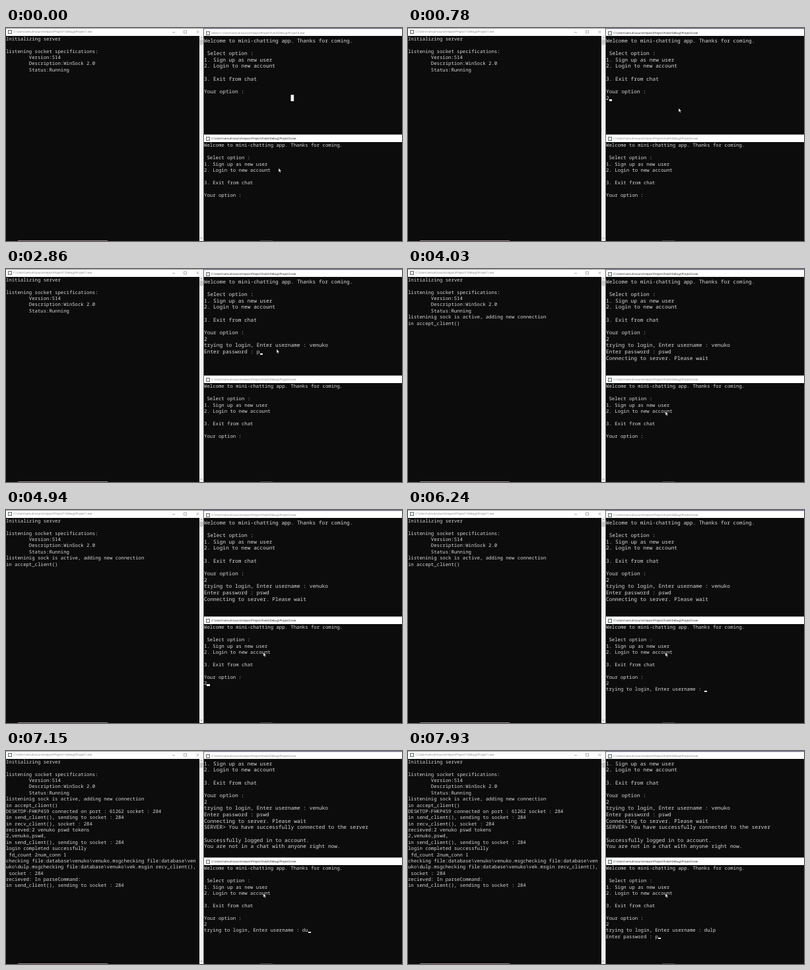
Write an HTML page that moves like this. It is 600x323 px and loops after 8 s.

```html
<!DOCTYPE html>
<html lang="en">
<head>
<meta charset="utf-8">
<title>Chat server and two clients</title>
<style>
  html, body { margin: 0; width: 100%; height: 100%; overflow: hidden; background: #0c0c0c; }
  #stage { position: relative; width: 600px; height: 323px; overflow: hidden; background: #0c0c0c; text-rendering: geometricPrecision; }
  #stage * { position: absolute; box-sizing: border-box; }
  .window { overflow: hidden; background: #0c0c0c; }
  .bar { left: 0; top: 0; width: 100%; background: #fff; }
  .icon { left: 3px; top: 3px; width: 6px; height: 6px; background: #e6ecee; border: 1px solid #66706f; }
  .title { left: 11.2px; top: 1.2px; font: 4.38px/11.5px "Open Sans", sans-serif; white-space: pre; color: #777; }
  .active .title { color: #111; }
  .screen { left: 0; margin: 0; font-family: "Noto Sans Mono", monospace; white-space: pre; color: #dadada; }
  .caret { height: 2.4px; background: #f2f2f2; }
  svg { left: 0; top: 0; overflow: visible; }
</style>
</head>
<body>
<div id="stage"></div>
<script>
const LOOP = 8000, KEY = 130;
const USER = 'venuko', FRIEND = 'dulp', OTHER = 'vek', HOME = 'venuk';
const stage = document.getElementById('stage');

const typing = (start, keys) => [...keys].map((key, i) => [start + i * KEY, key, true]);
const latest = (steps, t) => steps.filter(step => step[0] <= t).pop();

const MENU = `Welcome to mini-chatting app. Thanks for coming.

 Select option :
1. Sign up as new user
2. Login to new account

3. Exit from chat

Your option :
`;
const ASK_NAME = '\ntrying to login, Enter username : ';
const ASK_PASSWORD = '\nEnter password : ';
const TAB = ' '.repeat(8);
const FILES = 'checking file:database\\' + USER + '\\';

// Each step: time, text appended, caret shown
const serverSteps = [
  [0, `Initializing server\n\nlistening socket specifications:\n${TAB}Version:514\n${TAB}Description:WinSock 2.0\n${TAB}Status:Running\n`],
  [3510, 'listeninig sock is active, adding new connection\nin accept_client()\n'],
  [6500, `DESKTOP-FHKP4S9 connected on port : 61262 socket : 284
in send_client(), sending to socket : 284
in recv_client(), socket : 284
recieved:2 ${USER} pswd tokens
2,${USER},pswd,
in send_client(), sending to socket : 284
login completed successfully
 fd_count 2num_conn 1
${FILES}${USER}.msg${FILES}${FRIEND}.msg${FILES}${OTHER}.msg`],
  [7020, 'in recv_client(), socket : 284\nrecieved: In parseCommand:\nin send_client(), sending to socket : 284\n'],
];

const upperSteps = [
  [0, MENU],
  [650, '', true],
  [780, '2', true],
  [1040, ASK_NAME, true],
  ...typing(1690, [...USER.slice(0, 3), USER.slice(3, 5), USER.slice(5)]),
  [2340, ASK_PASSWORD, true],
  ...typing(2860, 'pswd'),
  [3380, '\nConnecting to server. Please wait\n', true],
  [3510, ''],
  [6500, 'SERVER> You have successfully connected to the server\n\nSuccessfully logged in to account.\n'],
  [7020, 'You are not in a chat with anyone right now.\n'],
];

const lowerSteps = [
  [0, MENU],
  [130, '', true],
  [260, ''],
  [4160, '', true],
  [4550, ''],
  [4680, '', true],
  [4940, '2', true],
  [5330, ASK_NAME, true],
  [5980, ''],
  [6240, '', true],
  [6630, ''],
  ...typing(7020, FRIEND),
  [7540, ASK_PASSWORD, true],
  [7930, 'p', true],
];

const mouseSteps = [[0, 413, 212.5], [130, 412, 170], [260, 410, 121.5], [3900, 399, 172], [4030, 390, 216]];
const focusSteps = [[0, 'lower'], [260, 'upper'], [4160, 'lower']];

function add(parent, className, style = {}) {
  const node = document.createElement('div');
  node.className = className;
  for (const key in style) {
    node.style[key] = typeof style[key] === 'number' ? style[key] + 'px' : style[key];
  }
  return parent.appendChild(node);
}

function makeConsole({ name, path, steps, left, top, width, height, bar, textTop, cell, pitch, cols, rows }) {
  const frame = add(stage, 'window', { left, top, width, height });
  const barNode = add(frame, 'bar', { height: bar });
  add(barNode, 'icon');
  const title = add(barNode, 'title');
  const screen = add(frame, 'screen', { top: textTop, fontSize: cell / 0.6, lineHeight: pitch + 'px' });
  const caret = add(frame, 'caret', { width: cell });
  const fullPath = `C:\\Users\\${HOME}\\source\\repos\\${path}`;
  const wrap = new RegExp(`.{1,${cols}}`, 'g');

  return t => {
    const text = steps.filter(step => step[0] <= t).map(step => step[1]).join('');
    const lines = text.split('\n').flatMap(line => line.match(wrap) || ['']).slice(-rows);
    screen.textContent = lines.join('\n');
    caret.style.display = latest(steps, t)[2] ? 'block' : 'none';
    caret.style.left = lines[lines.length - 1].length * cell + 'px';
    caret.style.top = textTop + lines.length * pitch - 4 + 'px';
    title.textContent = (name === 'upper' && t < 650 ? 'Select ' : '') + fullPath;
    frame.classList.toggle('active', latest(focusSteps, t)[1] === name);
  };
}

const consoles = [
  makeConsole({
    name: 'server', path: 'Project1\\Debug\\Project1.exe', steps: serverSteps,
    left: 0, top: 0, width: 300, height: 323, bar: 11.5, textTop: 12.9,
    cell: 4.37, pitch: 9.38, cols: 66, rows: 33,
  }),
  makeConsole({
    name: 'upper', path: 'Project3\\x64\\Debug\\Project3.exe', steps: upperSteps,
    left: 300, top: 2, width: 300, height: 159, bar: 10, textTop: 13.6,
    cell: 4.7, pitch: 9.67, cols: 63, rows: 15,
  }),
  makeConsole({
    name: 'lower', path: 'Project3\\x64\\Debug\\Project3.exe', steps: lowerSteps,
    left: 300, top: 162, width: 300, height: 161, bar: 11, textTop: 12.3,
    cell: 4.38, pitch: 9.4, cols: 68, rows: 15,
  }),
];

stage.insertAdjacentHTML('beforeend', `
<svg width="600" height="323" fill="none">
  <path d="M252 6.5h4M269.500 4h4v4h-4zM288.500 4l4 4m0-4l-4 4" stroke="#777" stroke-width=".6"/>
  <path d="M293 11.500h6V323h-6z" fill="#f0f0f0"/>
  <path d="M293.500 17.500h5v8h-5z" fill="#c6c6c6"/>
  <path d="M294.500 15.300l1.500-1.500 1.500 1.500M294.500 318l1.500 1.500 1.500-1.500" stroke="#666" stroke-width=".7"/>
  <path d="M0 0h299v1H0z" fill="#999"/>
  <path d="M299 0h1v323h-1z" fill="#666"/>
  <path d="M300 0h300v1H300z" fill="#6b6880"/>
  <path d="M300 1h300v1H300z" fill="#cfcde0"/>
  <path d="M300 161h300v1H300z" fill="#77777c"/>
  <path d="M18 322h136v1H18z" fill="#9a8a90"/>
  <path d="M385 322h19v1h-19z" fill="#444"/>
  <path id="selection" d="M431.500 101.300h4.700v9.700h-4.700z" fill="#f2f2f2"/>
  <path id="mouse" d="M0 0v6l1.400-1.200 1 2.200 1-.5-1-2.100h1.900z" fill="#fff" stroke="#000" stroke-width=".4"/>
</svg>`);
const selection = document.getElementById('selection');
const mouse = document.getElementById('mouse');

function draw(now) {
  const t = now % LOOP;
  consoles.forEach(update => update(t));
  selection.style.display = t < 650 ? '' : 'none';
  const [, x, y] = latest(mouseSteps, t);
  mouse.setAttribute('transform', `translate(${x} ${y})`);
}

const start = performance.now();
function tick() {
  draw(performance.now() - start);
  requestAnimationFrame(tick);
}
tick();
</script>
</body>
</html>
```
